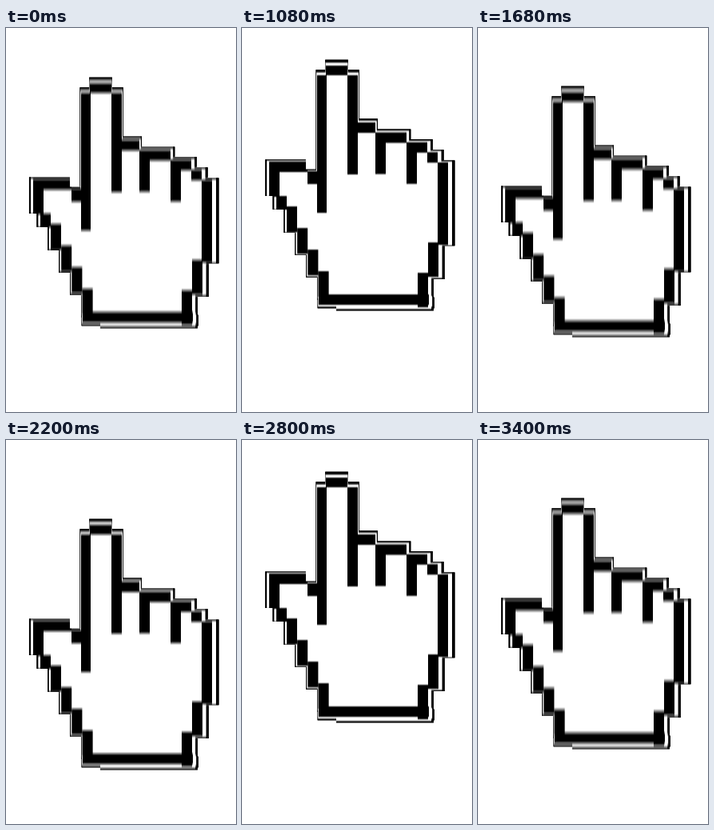
Recreate the animation shown at these times as an HTML page with a canvas. Size 288 px wide and 480 px high, loop 3440 ms.

```html
<!DOCTYPE html>
<html lang="en">
<head>
<meta charset="utf-8">
<title>Bobbing hand pointer</title>
<style>
html, body { margin: 0; width: 100%; height: 100%; overflow: hidden; background: #fff; }
canvas { display: block; width: 288px; height: 480px; }
</style>
</head>
<body>
<canvas id="stage" width="288" height="480"></canvas>
<script>
const W = 288, H = 480;
const STEP = 40, FRAMES = 86, PERIOD = 860;
const SWING = 37.2, CENTRE = 34.6;
const MID_X = 118, MID_Y = 235, PEN = 13;
const ctx = document.getElementById('stage').getContext('2d');

const ink = new Path2D();   // black pixel strokes
const body = new Path2D();  // whole silhouette

// Adds a stroke and fills the silhouette from it to the middle line.
function bar(x, y, w, h, reach = MID_X) {
  ink.rect(x, y, w, h);
  const left = Math.min(x, reach), right = Math.max(x + w, reach);
  body.rect(left, y, right - left, h);
}

function buildHand() {
  // Index finger
  bar(105, 47, 27, 12);
  bar(94, 59, 12, 172);
  bar(132, 59, PEN, 124);

  // Knuckles step down to the right, two of them with a finger gap
  const edges = [145, 167, 206, 232, 245];
  for (let i = 0; i < 4; i++) {
    const y = 118 + 12.4 * i;
    bar(edges[i], y, edges[i + 1] - edges[i], PEN);
    if (i === 1 || i === 2) bar(edges[i], y, PEN, 52);
  }

  // Right side and wrist
  bar(245, 168, PEN, 103);
  for (let i = 0; i < 2; i++) bar(233 - 13 * i, 268 + 38 * i, PEN, 43);
  bar(96, 333, 138, PEN);

  // Thumb, then the left stairs
  bar(34, 167, 48, PEN, 82);
  bar(34, 180, PEN, 31);
  bar(82, 179, PEN, 16);
  bar(43, 210, PEN, 17);
  for (let i = 0; i < 4; i++) bar(56 + 13.2 * i, 223 + 27 * i, PEN, 32);
}

function scaleAboutMid(c, sx, sy) {
  c.translate(MID_X, MID_Y);
  c.scale(sx, sy);
  c.translate(-MID_X, -MID_Y);
}

function fillScaled(c, path, color, sx, sy) {
  c.save();
  scaleAboutMid(c, sx, sy);
  c.fillStyle = color;
  c.fill(path);
  c.restore();
}

const OUTER = [1.06, 1.038], RIM = [1.036, 1.02];

function makeSprite() {
  const sprite = document.createElement('canvas');
  sprite.width = W;
  sprite.height = H;
  const c = sprite.getContext('2d');
  c.fillStyle = '#000';
  c.fillRect(0, 0, W, H);
  fillScaled(c, body, '#fff', ...RIM);
  fillScaled(c, ink, '#000', 1, 1);
  return sprite;
}

buildHand();
const hand = makeSprite();

function draw(t) {
  const angle = (t + 46) / PERIOD * 2 * Math.PI;
  const dy = Math.round(CENTRE - SWING * Math.sin(angle));
  const speed = Math.abs(SWING * Math.cos(angle)) * 2 * Math.PI * STEP / PERIOD;
  const smear = Math.max(0.6, speed * 0.55);
  const samples = 10;

  ctx.globalAlpha = 1;
  ctx.fillStyle = '#fff';
  ctx.fillRect(0, 0, W, H);
  ctx.save();
  ctx.translate(0, dy);
  const upright = ctx.getTransform();
  scaleAboutMid(ctx, ...OUTER);
  ctx.clip(body);
  ctx.setTransform(upright);
  // Average shifted copies: vertical motion blur inside a sharp edge
  for (let i = 0; i < samples; i++) {
    ctx.globalAlpha = 1 / (i + 1);
    ctx.drawImage(hand, 0, ((i + 0.5) / samples - 0.5) * smear);
  }
  ctx.restore();
}

const start = performance.now();
function tick() {
  const elapsed = Math.max(0, performance.now() - start);
  draw(Math.floor(elapsed / STEP) % FRAMES * STEP);
  requestAnimationFrame(tick);
}
tick();
</script>
</body>
</html>
```
